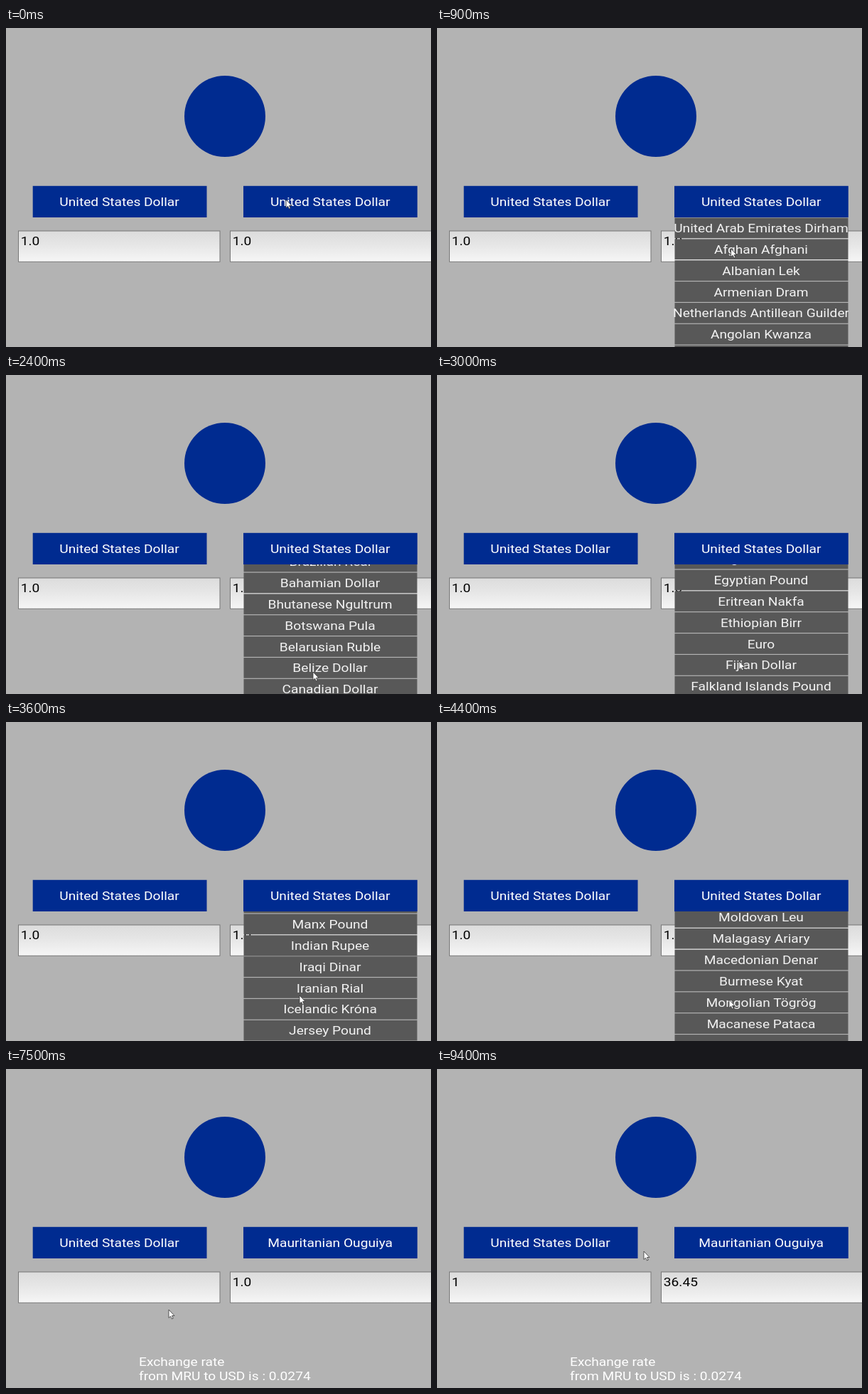
Write an HTML page that moves like this. It is 598 by 448 pixels and loops after 9500 ms.

```html
<!DOCTYPE html>
<html lang="en">
<head>
<meta charset="utf-8">
<title>Currency converter</title>
<style>
  html, body { margin: 0; width: 100%; height: 100%; overflow: hidden; background: #b3b3b3; }
  svg { display: block; width: 598px; height: 448px; }
  text { font: 17px Roboto, sans-serif; fill: #fff; white-space: pre; }
  .mid { text-anchor: middle; }
  .button { fill: #002b90; }
  .field { fill: url(#shade); stroke: #777; stroke-width: 1; }
  .value { fill: #000; }
  .row { fill: #585858; }
  .item { fill: #f2f2f2; }
</style>
</head>
<body>
<svg id="stage" viewBox="0 0 598 448">
  <defs>
    <linearGradient id="shade" x2="0" y2="1">
      <stop offset="0" stop-color="#dcdcdc"/>
      <stop offset=".45" stop-color="#e6e6e6"/>
      <stop offset="1" stop-color="#f6f6f6"/>
    </linearGradient>
    <clipPath id="window"><rect x="333" y="266" width="246" height="182"/></clipPath>
  </defs>
  <rect width="598" height="448" fill="#b3b3b3"/>
  <circle cx="308" cy="124" r="57" fill="#002b90"/>
</svg>
<script>
const LOOP = 9500, STEP = 100;
const ROW = 29.85, LIST_TOP = 266;
const WIDEN = 1.128;

const currencies = `United Arab Emirates Dirham,Afghan Afghani,Albanian Lek,Armenian Dram,
Netherlands Antillean Guilder,Angolan Kwanza,Argentine Peso,Australian Dollar,Aruban Florin,
Azerbaijani Manat,Bosnia and Herzegovina Mark,Barbados Dollar,Bangladeshi Taka,Bulgarian Lev,
Bahraini Dinar,Burundian Franc,Bermudian Dollar,Brunei Dollar,Bolivian Boliviano,Brazilian Real,
Bahamian Dollar,Bhutanese Ngultrum,Botswana Pula,Belarusian Ruble,Belize Dollar,Canadian Dollar,
Congolese Franc,Swiss Franc,Unidad de Fomento,Chilean Peso,Chinese Yuan Offshore,Chinese Yuan,
Colombian Peso,Costa Rican Colón,Cuban Convertible Peso,Cuban Peso,Cape Verdean Escudo,Czech Koruna,
Djiboutian Franc,Danish Krone,Dominican Peso,Algerian Dinar,Egyptian Pound,Eritrean Nakfa,
Ethiopian Birr,Euro,Fijian Dollar,Falkland Islands Pound,Pound Sterling,Georgian Lari,Guernsey Pound,
Ghanaian Cedi,Gibraltar Pound,Gambian Dalasi,Guinean Franc,Guatemalan Quetzal,Guyanese Dollar,
Hong Kong Dollar,Honduran Lempira,Croatian Kuna,Haitian Gourde,Hungarian Forint,Indonesian Rupiah,
Israeli Shekel,Manx Pound,Indian Rupee,Iraqi Dinar,Iranian Rial,Icelandic Króna,Jersey Pound,
Jamaican Dollar,Jordanian Dinar,Japanese Yen,Kenyan Shilling,Kyrgyzstani Som,Cambodian Riel,
Comorian Franc,North Korean Won,South Korean Won,Kuwaiti Dinar,Cayman Islands Dollar,
Kazakhstani Tenge,Lao Kip,Lebanese Pound,Sri Lankan Rupee,Liberian Dollar,Lesotho Loti,Libyan Dinar,
Moroccan Dirham,Moldovan Leu,Malagasy Ariary,Macedonian Denar,Burmese Kyat,Mongolian Tögrög,
Macanese Pataca,Mauritanian Ouguiya,Mauritian Rupee,Maldivian Rufiyaa,Malawian Kwacha,
Mexican Peso`.replace(/\n/g, '').split(',');

// Keys: [time, value, ...]; scroll is measured in rows.
const scrollKeys = [[1350, 0], [1700, 6.43], [2400, 19.63], [3600, 63.9], [4400, 89.22], [4700, 91]];
const pointerKeys = [
  [0, 394, 241], [700, 400, 244], [1200, 434, 409], [1700, 434, 409], [2400, 432, 417],
  [3000, 425, 402], [3600, 413, 384], [4400, 411, 390], [5200, 411, 394], [5700, 318, 367],
  [6100, 280, 330], [6600, 229, 303], [7100, 229, 303], [7500, 229, 338], [9200, 229, 338],
  [9400, 291, 256]
];
const OPEN = 700, CHOOSE = 5200;
const leftKeys = [[0, '1.0'], [CHOOSE, '0.0274'], [6900, '0.027'], [7000, '0.02'], [7100, '0.0'],
  [7200, '0.'], [7300, '0'], [7400, ''], [7700, '1']];
const rightKeys = [[0, '1.0'], [7700, '36.45']];

const stage = document.getElementById('stage');

function add(parent, tag, attrs, content = '') {
  const node = document.createElementNS('http://www.w3.org/2000/svg', tag);
  for (const name in attrs) node.setAttribute(name, attrs[name]);
  node.textContent = content;
  return parent.appendChild(node);
}
const box = (parent, cls, x, y, width, height) =>
  add(parent, 'rect', { class: cls, x, y, width, height });
const label = (parent, cls, x, y, content) =>
  add(parent, 'text', { class: cls, transform: `translate(${x} ${y}) scale(${WIDEN} 1)` }, content);

function tween(keys, t) {
  const next = keys.findIndex(key => key[0] > t);
  if (next < 0) return keys[keys.length - 1].slice(1);
  if (next === 0) return keys[0].slice(1);
  const a = keys[next - 1], b = keys[next], p = (t - a[0]) / (b[0] - a[0]);
  return a.slice(1).map((v, i) => v + (b[i + 1] - v) * p);
}
const hold = (keys, t) => keys.filter(key => key[0] <= t).pop()[1];

box(stage, 'button', 37.7, 221.8, 244.8, 44.2);
box(stage, 'button', 334, 221.8, 244.8, 44.2);
label(stage, 'mid', 159.5, 250, 'United States Dollar');
const target = label(stage, 'mid', 456.2, 250);

box(stage, 'field', 17.5, 285, 283.5, 43.3);
box(stage, 'field', 315.5, 285, 290, 43.3);
const left = label(stage, 'value', 20.8, 304.8);
const right = label(stage, 'value', 318.8, 304.8);

const rate = add(stage, 'g', {});
label(rate, '', 187, 417, 'Exchange rate');
label(rate, '', 187, 437, 'from MRU to USD is : 0.0274');

const dropdown = add(stage, 'g', { 'clip-path': 'url(#window)' });
const list = add(dropdown, 'g', {});
currencies.forEach((name, i) => {
  const y = LIST_TOP + i * ROW;
  box(list, 'row', 334.5, y + .6, 244, ROW - 1.2);
  label(list, 'item mid', 456, y + 21, name);
});

const pointer = add(stage, 'path', {
  d: 'M0 0V11.5L2.6 9.2L4.4 13L6.2 12.2L4.5 8.5H8Z',
  fill: '#fff', stroke: '#333', 'stroke-width': .8
});

function draw(now) {
  const t = Math.floor(now % LOOP / STEP) * STEP;
  const chosen = t >= CHOOSE;
  target.textContent = chosen ? 'Mauritanian Ouguiya' : 'United States Dollar';
  left.textContent = hold(leftKeys, t);
  right.textContent = hold(rightKeys, t);
  rate.style.display = chosen ? '' : 'none';
  dropdown.style.display = t >= OPEN && !chosen ? '' : 'none';
  list.setAttribute('transform', `translate(0 ${-tween(scrollKeys, t)[0] * ROW})`);
  pointer.setAttribute('transform', `translate(${tween(pointerKeys, t)})`);
}

const start = performance.now();
function tick() {
  draw(performance.now() - start);
  requestAnimationFrame(tick);
}
tick();
</script>
</body>
</html>
```
